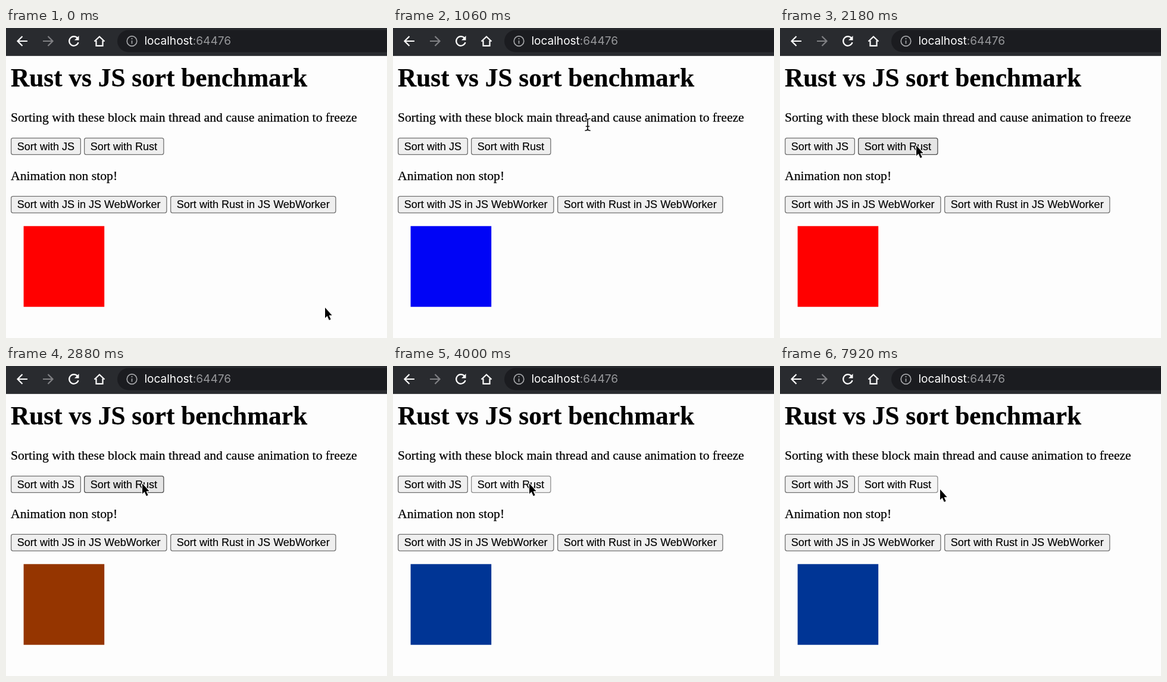
Animation, 640 px wide and 520 px high, one loop 8000 ms. Source, as an HTML page:

```html
<!DOCTYPE html>
<html lang="en">
<head>
<meta charset="utf-8">
<title>Sort benchmark</title>
<style>
  html, body { margin: 0; width: 100%; height: 100%; overflow: hidden; background: #fdfdfd; }
  svg { display: block; width: 640px; height: 520px; }
  .page { font: 21.65px "Liberation Serif", serif; stroke: #000; stroke-width: .25; }
  .page .title { font-size: 43.3px; font-weight: bold; }
  .url { font: 19.05px Inter, sans-serif; fill: #fff; }
  .icons { fill: none; stroke: #fff; stroke-width: 2.2; }
  .button text { font: 18.05px "Liberation Sans", sans-serif; stroke: #000; stroke-width: .15; }
  .button rect { fill: #efefef; stroke: #717171; stroke-width: 1.3; }
  .button.hover rect { fill: #e5e5e5; stroke: #4f4f4f; }
  .button.pressed rect { fill: #f5f5f5; stroke: #8d8d8d; }
</style>
</head>
<body>
<svg viewBox="0 0 640 520">
  <defs>
    <path id="beamShape" d="M-4 -10Q0 -10 0 -7V7Q0 10 -4 10M4 -10Q0 -10 0 -7M0 7Q0 10 4 10M-2.5 3H2.5"/>
  </defs>
  <rect width="640" height="520" fill="#fdfdfd"/>
  <rect width="640" height="47" fill="#292b2f"/>
  <rect y="46" width="640" height="1" fill="#46474a"/>
  <rect x="187" y="3.5" width="480" height="37" rx="18.5" fill="#1b1c20"/>
  <g class="icons">
    <path d="M36 22H20M27.5 14L19.5 22L27.5 30"/>
    <path d="M62 22H78M70.5 14L78.5 22L70.5 30" stroke="#808184"/>
    <path d="M120 17A7.8 7.8 0 1 0 121.500 24"/>
    <path d="M122.5 13V20.500H115Z" fill="#fff" stroke="none"/>
    <path d="M148.5 22.5L157 14.5L165.5 22.5M151.5 21V29.8H162.5V21"/>
    <g stroke="#a5a6a9" stroke-width="1.7">
      <circle cx="211.5" cy="22" r="8.3"/>
      <path d="M211.5 21V26.5M211.5 17V19"/>
    </g>
  </g>
  <text class="url" x="232.500" y="28.3">localhost<tspan fill="#97989b">:64476</tspan></text>

  <g class="page">
    <text class="title" x="8" y="98">Rust vs JS sort benchmark</text>
    <text x="8" y="157">Sorting with these block main thread and cause animation to freeze</text>
    <text x="8" y="255">Animation non stop!</text>
  </g>
  <g id="buttons"></g>
  <rect id="square" x="29.6" y="332.3" width="135.6" height="135.4"/>

  <g id="arrow">
    <path d="M1 1V18.5L4.6 15L7.8 22L10.6 20.8L7.600 13.900H12.600Z"
      stroke="#fff" stroke-width="2.4" paint-order="stroke" stroke-linejoin="round"/>
  </g>
  <g id="beam" fill="none" stroke-linecap="round">
    <use href="#beamShape" stroke="#fff" stroke-width="4"/>
    <use href="#beamShape" stroke="#111" stroke-width="1.7"/>
  </g>
</svg>
<script>
const LOOP = 8000, THAW = 360, FREEZE = 4000;
const $ = id => document.getElementById(id);
const clamp = v => Math.max(0, Math.min(1, v));
const smooth = v => v * v * (3 - 2 * v);
const mix = (a, b, k) => a + (b - a) * k;
const inside = ([x, y], [left, top, right, bottom]) =>
  x >= left && x <= right && y >= top && y <= bottom;

// label, left, top, right
const buttons = [
  ["Sort with JS", 8, 184, 126],
  ["Sort with Rust", 131, 184, 265.5],
  ["Sort with JS in JS WebWorker", 8, 281.7, 270.5],
  ["Sort with Rust in JS WebWorker", 276, 281.7, 554.5]
].map(([label, left, top, right]) => {
  const group = document.createElementNS("http://www.w3.org/2000/svg", "g");
  group.innerHTML = `<rect x="${left + .65}" y="${top + .65}" rx="3" width="${right - left - 1.3}" height="27.7"/>
    <text x="${left + 10.8}" y="${top + 20.5}">${label}</text>`;
  $("buttons").append(group);
  return { group, box: [left, top, right, top + 29] };
});

const textBoxes = [[8, 60, 505, 108], [8, 138, 590, 165], [8, 236, 187, 262]];

// time, x, y of the pointer
const path = [
  [0, 535, 468], [360, 535, 468], [1060, 327, 162], [1160, 327, 162],
  [1850, 228, 196], [4600, 228, 196], [5000, 268, 206], [LOOP, 268, 206]
];

function pointer(t) {
  const i = path.findIndex(p => p[0] > t);
  const [a, b] = [path[i - 1], path[i]];
  const k = smooth((t - a[0]) / (b[0] - a[0]));
  return [mix(a[1], b[1], k), mix(a[2], b[2], k)];
}

const colors = [[255, 0, 0], [0, 128, 0], [0, 0, 255]];

// Each colour fades into the next and then holds; sorting blocks the fade.
function squareColor(t) {
  if (t < THAW) return colors[0];
  const u = (Math.min(t, FREEZE) - 2600) / 1050 + 3;
  const i = Math.floor(u);
  const k = smooth(clamp((u - i) / .6));
  return colors[i % 3].map((c, n) => mix(c, colors[(i + 1) % 3][n], k));
}

function draw(t) {
  const frozen = t >= FREEZE, pos = pointer(t);
  const overText = textBoxes.some(box => inside(pos, box));
  buttons.forEach(({ group, box }, i) => {
    const state = frozen ? (i === 1 ? "pressed" : "") : inside(pos, box) ? "hover" : "";
    group.setAttribute("class", "button " + state);
  });
  $("square").setAttribute("fill", `rgb(${squareColor(t).map(Math.round)})`);
  for (const [id, shown] of [["arrow", !overText], ["beam", overText]]) {
    $(id).setAttribute("transform", `translate(${pos})`);
    $(id).style.display = shown ? "" : "none";
  }
}

let start;
function tick(now) {
  start ??= now;
  draw(Math.max(0, now - start) % LOOP);
  requestAnimationFrame(tick);
}
draw(0);
requestAnimationFrame(tick);
</script>
</body>
</html>
```
